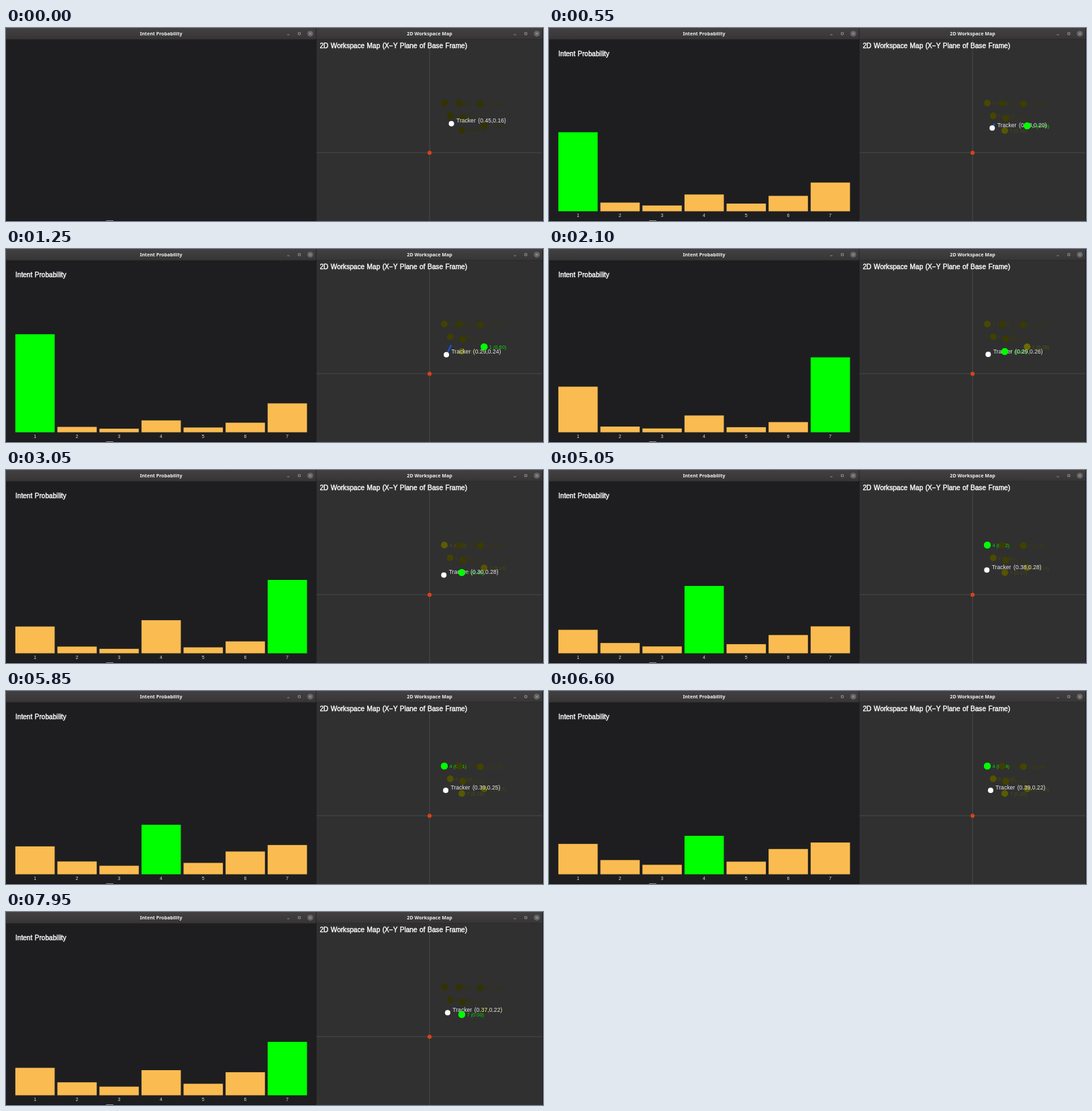
These frames come from a looping animation (800 by 288 pixels, 8 s). An HTML page:

```html
<!DOCTYPE html>
<html lang="en">
<head>
<meta charset="utf-8">
<title>Intent Probability</title>
<style>
  html, body { margin: 0; width: 100%; height: 100%; overflow: hidden; background: #1e1e20; }
  svg { display: block; width: 100vw; height: 100vh; }
  text { font-family: "Liberation Sans", Arial, sans-serif; fill: #fff; white-space: pre; }
  .title { font: bold 7.1px "Noto Sans", sans-serif; text-anchor: middle; fill: #f2f2f2; }
  .heading { font-size: 10.1px; word-spacing: .7px; stroke: #fff; stroke-width: .4px; }
  .number { font-size: 7px; text-anchor: middle; fill: #d8d8d8; }
  .label { font-size: 7.4px; }
  .tracker { font-size: 8.6px; word-spacing: 1.2px; fill: #e8e8e8; }
</style>
</head>
<body>
<svg viewBox="0 0 800 288" preserveAspectRatio="none">
  <defs>
    <linearGradient id="bar" x2="0" y2="1">
      <stop offset="0" stop-color="#434041"/>
      <stop offset="1" stop-color="#373536"/>
    </linearGradient>
  </defs>
  <rect width="462" height="288" fill="#1e1e20"/>
  <rect y="287" width="462" height="1" fill="#141415"/>
  <rect x="149" y="287" width="11" height="1" fill="#888"/>
  <rect x="462" width="338" height="288" fill="#303030"/>
  <path d="M631 17V288M462 186H800" stroke="#484848"/>
  <circle cx="631" cy="186.2" r="2.9" fill="#ee4718"/>
  <path d="M628 186.2h6M631 183.5v5.5" stroke="#b8351a" stroke-width=".6"/>
  <text class="heading" x="467.4" y="30.2">2D Workspace Map (X−Y Plane of Base Frame)</text>
  <g id="windows"></g>
  <g id="chart"><text class="heading" x="14" y="41.5">Intent Probability</text></g>
  <g id="map"></g>
</svg>
<script>
const LOOP = 8000, STEP = 50, START = 50, RESET = 7900;
const FLOOR = 273.5, CHART_SCALE = 242, TRAIL_AGE = 1200;
const GREEN = '#00ff00', ORANGE = '#fabc51';

// resting: how likely each goal is without evidence; x, y: place on the map
const goals = [
  { resting: 19, x: 712.3, y: 146 },
  { resting: 9, x: 706.8, y: 113 },
  { resting: 6, x: 675.5, y: 112.3 },
  { resting: 15, x: 653, y: 112 },
  { resting: 8, x: 680.5, y: 134.8 },
  { resting: 16, x: 661.8, y: 131 },
  { resting: 19, x: 679, y: 153 }
];

// Evidence for a goal peaks at a time and fades to both sides.
const evidence = [
  { goal: 1, at: 1250, strength: 145, fade: 840 },
  { goal: 7, at: 2500, strength: 175, fade: 700 },
  { goal: 4, at: 4250, strength: 98, fade: 1000 },
  { goal: 7, at: 7950, strength: 18, fade: 400 }
];

// time, workspace x and y
const waypoints = [
  [0, .45, .16], [1250, .29, .24], [3050, .30, .28], [4250, .37, .31],
  [5850, .39, .25], [6600, .39, .22], [7950, .37, .22]
];

const byId = id => document.getElementById(id);

function set(node, attrs) {
  for (const name in attrs) node.setAttribute(name, attrs[name]);
}

function add(parent, tag, attrs, content = '') {
  const node = document.createElementNS('http://www.w3.org/2000/svg', tag);
  set(node, attrs);
  node.textContent = content;
  return parent.appendChild(node);
}

function probabilities(t) {
  const weights = goals.map(goal => goal.resting);
  for (const { goal, at, strength, fade } of evidence) {
    weights[goal - 1] += strength * Math.exp(-Math.abs(t - at) / fade);
  }
  const total = weights.reduce((sum, w) => sum + w);
  return weights.map(w => w / total);
}

function position(time) {
  const t = Math.min(Math.max(time, 0), waypoints.at(-1)[0]);
  const next = Math.max(1, waypoints.findIndex(point => point[0] >= t));
  const [t0, x0, y0] = waypoints[next - 1], [t1, x1, y1] = waypoints[next];
  const k = (t - t0) / (t1 - t0);
  return [x0 + (x1 - x0) * k, y0 + (y1 - y0) * k];
}

// The map shows workspace x upward and workspace y to the left.
const toMap = ([wx, wy]) => [678.6 - 94 * wy, 185 - 94 * wx];

function addWindow(x, width, center, title) {
  const g = byId('windows'), right = x + width;
  add(g, 'rect', { x, y: 0, width, height: 17, fill: 'url(#bar)' });
  add(g, 'rect', { x, y: 16.6, width, height: .8, fill: '#262626' });
  add(g, 'text', { class: 'title', x: center, y: 11.3 }, title);
  add(g, 'circle', { cx: right - 9.2, cy: 8.4, r: 4.5, fill: '#656263' });
  add(g, 'path', {
    d: `M${right - 11} 6.6l3.6 3.6m0 -3.6l-3.6 3.6M${right - 43.6} 10h3.4M${right - 27.2} 6.8h3.2v3.2h-3.2z`,
    fill: 'none', stroke: '#c4c4c4', 'stroke-width': .6
  });
  add(g, 'rect', { x: right - .9, y: 0, width: .9, height: 288, fill: '#1a1a1a' });
}

addWindow(0, 462.5, 231, 'Intent Probability');
addWindow(462.5, 337.5, 631, '2D Workspace Map');

const chart = byId('chart'), map = byId('map');
const bars = goals.map((_, i) => {
  const x = 13.9 + i * 62.65;
  add(chart, 'text', { class: 'number', x: x + 29.2, y: 282.3 }, i + 1);
  return add(chart, 'rect', { x, width: 58.6 });
});
const labels = goals.map(({ x, y }) => add(map, 'text', { class: 'label', x: x + 7.5, y: y + 2.7 }));
const dots = goals.map(({ x, y }) => add(map, 'circle', { cx: x, cy: y, r: 5 }));
const trail = add(map, 'line', { stroke: '#1459e8', 'stroke-width': 2 });
const trackerText = add(map, 'text', { class: 'tracker' });
const favourite = add(map, 'circle', { r: 5.2, fill: GREEN });
const tracker = add(map, 'circle', { r: 4, fill: '#fff' });

function drawGoals(t) {
  const started = t >= START, known = started && t < RESET;
  const chances = probabilities(t);
  const best = started ? chances.indexOf(Math.max(...chances)) : -1;

  chart.style.display = favourite.style.display = started ? '' : 'none';
  chances.forEach((chance, i) => {
    const isBest = i === best, height = chance * CHART_SCALE;
    set(bars[i], { y: FLOOR - height, height, fill: isBest ? GREEN : ORANGE });
    const shown = known ? chance : 0;
    const tone = Math.round(51 + 204 * shown);
    const dim = `rgb(${tone},${tone},0)`;
    set(dots[i], { fill: isBest ? GREEN : dim });
    labels[i].style.fill = isBest ? '#00dc00' : dim;
    labels[i].style.opacity = isBest ? 1 : .65;
    labels[i].textContent = `${i + 1} (${shown.toFixed(2)})`;
  });
  if (started) set(favourite, { cx: goals[best].x, cy: goals[best].y });
}

function drawTracker(t) {
  const [wx, wy] = position(t);
  const [x, y] = toMap([wx, wy]);
  const [x2, y2] = toMap(position(t - TRAIL_AGE));
  set(tracker, { cx: x, cy: y });
  set(trail, { x1: x, y1: y, x2, y2 });
  set(trackerText, { x: x + 7.4, y: y - 1.6 });
  trackerText.textContent = `Tracker (${wx.toFixed(2)},${wy.toFixed(2)})`;
}

function draw(now) {
  const t = Math.floor((now % LOOP) / STEP) * STEP;
  drawGoals(t);
  drawTracker(t);
}

let origin;
function tick(now) {
  origin ??= now;
  draw(now - origin);
  requestAnimationFrame(tick);
}
draw(0);
requestAnimationFrame(tick);
</script>
</body>
</html>
```
